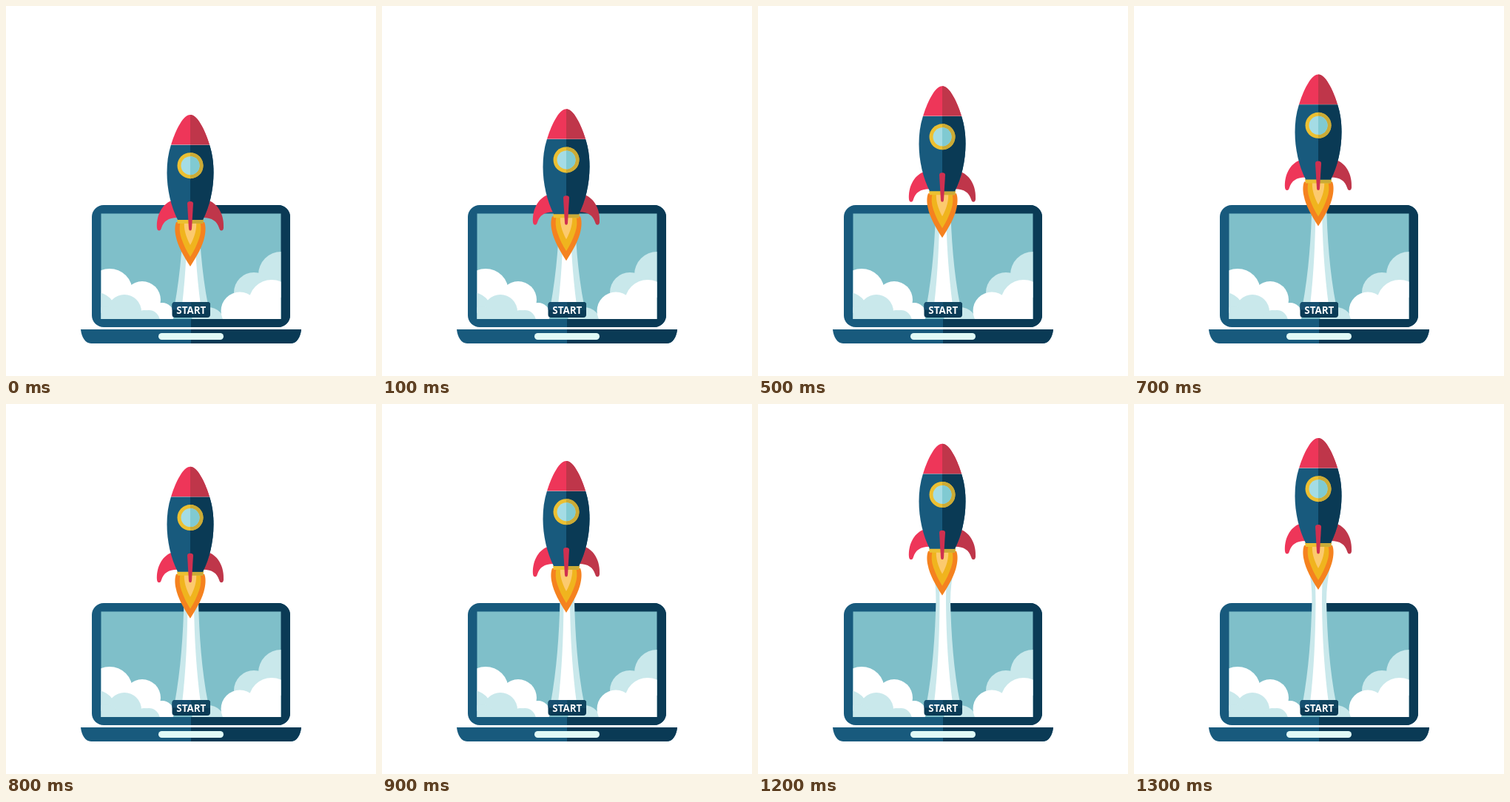
An HTML page with a canvas that plays this animation: 500 by 500 pixels, repeating every 3300 ms.

```html
<!DOCTYPE html>
<html>
<head>
<meta charset="utf-8">
<style>
  html, body { margin: 0; width: 100%; height: 100%; overflow: hidden; background: #fff; }
  canvas { display: block; width: 500px; height: 500px; }
</style>
</head>
<body>
<canvas id="stage" width="500" height="500"></canvas>
<script>
const ctx = document.getElementById('stage').getContext('2d');
const LOOP = 3300, STEP = 100, STEPS = 13, RISE = 101;
const BLUE = '#185a7d', NAVY = '#0a3a55', RED = '#ee3659', DARK_RED = '#bf364a';
const GOLD = '#ecc032', DARK_GOLD = '#cbab36', SKY = '#7fbfc9', MIST = '#c9e8eb';

function fill(shape, color) {
  ctx.fillStyle = color;
  ctx.fill(typeof shape === 'string' ? new Path2D(shape) : shape);
}

// Fills a shape with one colour left of x and another right of it.
function split(shape, left, right, x = 249) {
  const path = typeof shape === 'string' ? new Path2D(shape) : shape;
  fill(path, left);
  ctx.save();
  ctx.beginPath();
  ctx.rect(x, -100, 400, 700);
  ctx.clip();
  fill(path, right);
  ctx.restore();
}

function rounded(x, y, w, h, r) {
  const path = new Path2D();
  path.roundRect(x, y, w, h, r);
  return path;
}

function disc(x, y, r) {
  const path = new Path2D();
  path.arc(x, y, r, 0, Math.PI * 2);
  return path;
}

function puffs(color, list) {
  for (const [x, y, r] of list) fill(disc(x, y, r), color);
}

function laptop() {
  split(rounded(116, 269, 268, 165, 16), BLUE, NAVY, 250);
  split('M101 437H399C398 447 393 456 385 456H115C107 456 102 447 101 437Z', BLUE, NAVY, 250);
  fill(rounded(206, 442, 88, 9, 4.5), '#e0faf6');

  ctx.save();
  ctx.beginPath();
  ctx.rect(128.5, 280.5, 243, 142.5);
  ctx.clip();
  ctx.fillStyle = SKY;
  ctx.fillRect(128, 280, 244, 144);
  puffs(MIST, [[335, 387, 27], [372, 363, 31], [273, 430, 23]]);
  puffs('#fff', [[140, 386, 31], [184, 397, 25], [211, 417, 16],
                 [316, 412, 25.5], [359, 401, 31], [340, 420, 18], [165, 412, 26]]);
  puffs(MIST, [[122, 413, 26], [160, 413, 23], [187, 424, 20 - 7]]);
  puffs(MIST, [[193, 426, 15], [135, 424, 18]]);
  ctx.restore();
}

function trail() {
  fill('M236 220C239 236 240.5 250 240.5 266C239.5 312 236 360 228 404H273C264.5 360 261 312 260 266C260 250 262 236 265 220Z', MIST);
  fill('M244 220C245 240 245.5 256 245.5 270C245 318 243 362 238 404H263C257.5 362 254.5 318 254 270C254 256 254.5 240 255 220Z', '#fff');
}

function button() {
  fill(rounded(224.5, 400, 51.5, 21, 4), NAVY);
  ctx.save();
  ctx.beginPath();
  ctx.rect(224, 400, 53, 10.5);
  ctx.clip();
  split(rounded(224.5, 400, 51.5, 21, 4), '#164f70', '#10455f', 250);
  ctx.restore();
  ctx.fillStyle = '#fff';
  ctx.font = '700 13.4px "Open Sans", "Noto Sans", sans-serif';
  ctx.textAlign = 'center';
  ctx.textBaseline = 'alphabetic';
  ctx.fillText('START', 250.3, 415.5);
}

function rocket() {
  fill('M230 292C228 297 228 304 229.5 311C232 324 240 338 249 352C258 338 266 324 268.5 311C270 304 270 297 268 292Z', '#f5821f');
  fill('M235.5 292C234 300 234.5 307 237 314C240 323 244 331 249 339C254 331 258 323 261 314C263.5 307 264 300 262.5 292Z', '#f0b41e');
  fill('M241 292C240 301 243 312 249 323C255 312 258 301 257 292Z', '#fcca6e');

  fill('M224 263C210 268 203 284 204 300Q204.5 303.5 207 303.5Q209 303.5 210 300C213 291 219 286 232 286Z', RED);
  fill('M274 263C288 268 295 284 294 300Q293.5 303.5 291 303.5Q289 303.5 288 300C285 291 279 286 266 286Z', DARK_RED);
  split('M231 288.5H267L266 294H232Z', GOLD, DARK_GOLD);

  split('M223 187.5C219 200 217.5 212 217.5 225C217.5 248 223 271 232 289H266C275 271 280.5 248 280.5 225C280.5 212 279 200 275 187.5Z', BLUE, NAVY);
  split('M223 187.5C228 171 237 152 245 148Q249 146 253 148C261 152 270 171 275 187.5Z', RED, DARK_RED);
  ctx.fillStyle = 'rgba(255,255,255,.35)';
  ctx.fillRect(223, 187.2, 52, 0.7);

  split(disc(249, 215.7, 17.5), GOLD, DARK_GOLD);
  split(disc(249, 215.7, 12.5), '#a4dce5', '#80cad2');
  fill('M245 267Q245 264 249 264Q253 264 253 267L251 301Q250.8 303.5 249 303.5Q247.2 303.5 247 301Z', '#cf3050');
}

function draw(now) {
  const step = Math.min(STEPS, Math.floor((now % LOOP) / STEP));
  ctx.fillStyle = '#fff';
  ctx.fillRect(0, 0, 500, 500);
  laptop();
  trail();
  button();
  ctx.save();
  ctx.translate(0, -RISE * step / STEPS);
  rocket();
  ctx.restore();
  requestAnimationFrame(draw);
}

requestAnimationFrame(draw);
</script>
</body>
</html>
```
